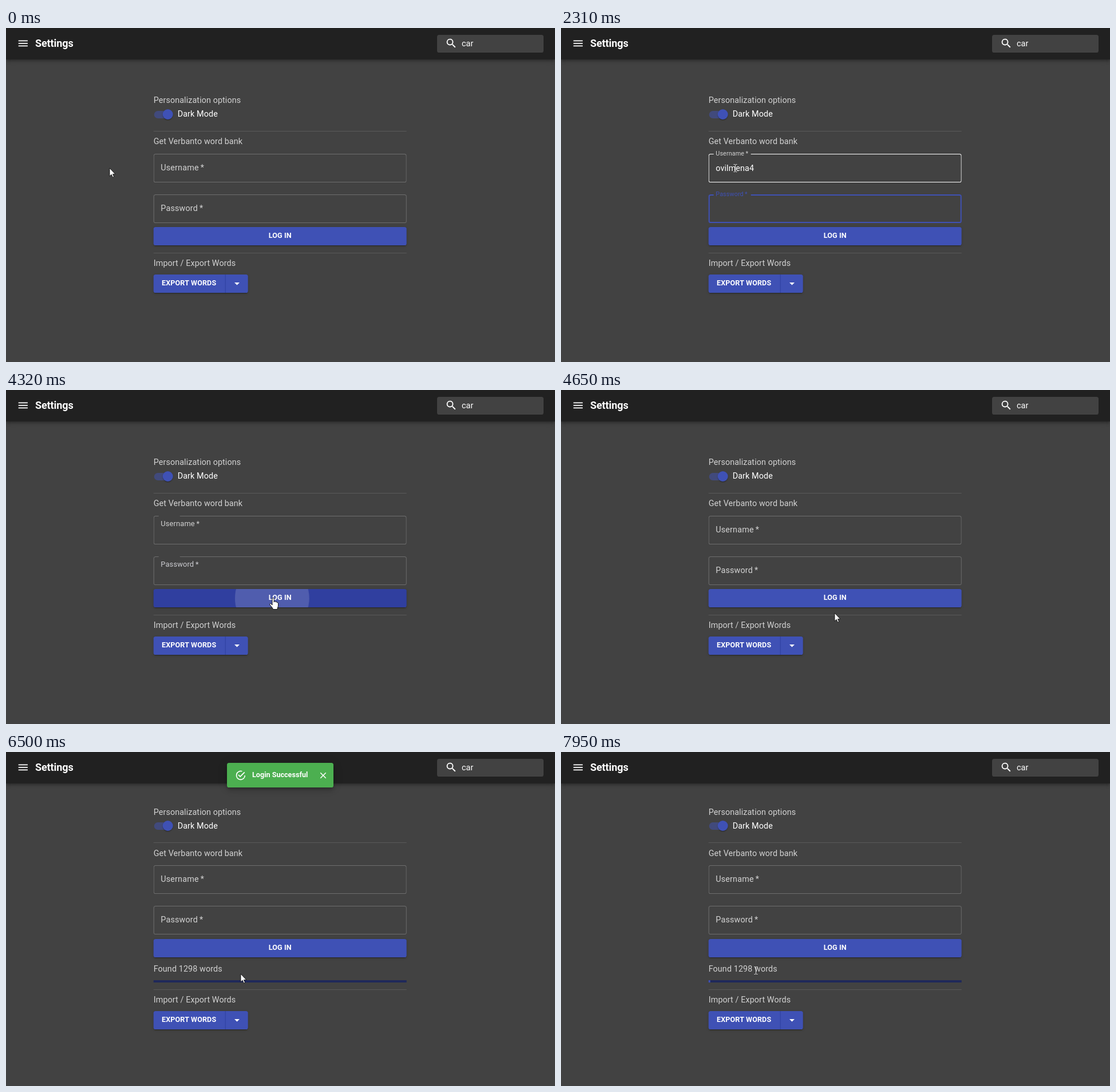
Write an HTML page that moves like this. It is 959 by 584 pixels and loops after 7990 ms.

```html
<!DOCTYPE html>
<html lang="en">
<head>
<meta charset="utf-8">
<title>Settings</title>
<style>
html, body { margin: 0; width: 100%; height: 100%; overflow: hidden; background: #424242; }
body { position: relative; font: 14.4px/17px Roboto, sans-serif; letter-spacing: .005em; color: #fff; }
div, p, svg { position: absolute; margin: 0; }
p { white-space: pre; }
svg { overflow: visible; fill: #fff; }
.bar { left: 0; right: 0; top: 0; height: 55px; background: #212121;
  box-shadow: 0 2px 4px -1px #0003, 0 4px 5px #00000024, 0 1px 10px #0000001f; }
.title { left: 51px; top: 16px; font: 600 18px/21px Roboto, sans-serif; letter-spacing: -.005em; }
.search { left: 753px; top: 11.5px; width: 185.5px; height: 31px; border-radius: 3.6px; background: #424242; }
.group { left: 258px; top: 0; width: 442px; transform: translateX(-.3px); }
.soft { color: rgba(255,255,255,.76); }
.rule { left: 0; width: 442px; height: 1px; background: rgba(255,255,255,.12); }
.track { left: .7px; top: 145px; width: 30.6px; height: 12.6px; border-radius: 7px; background: #3f51b5; opacity: .5; }
.thumb { left: 16px; top: 142px; width: 18px; height: 18px; border-radius: 50%; background: #3f51b5;
  box-shadow: 0 2px 1px -1px #0003, 0 1px 1px #00000024, 0 1px 3px #0000001f; }
.field { left: 0; width: 442px; height: 50px; }
.box { inset: 0; border-radius: 3.6px; }
.notch { left: 9px; top: 0; height: 2px; background: #424242; }
.label { left: 0; top: 0; line-height: 14.4px; letter-spacing: .00938em; transform-origin: 0 0; }
.value { left: 12.6px; top: 17px; }
.caret { display: inline-block; width: 1px; height: 17px; margin-right: -1px; background: #fff; vertical-align: top; }
.button { left: 0; height: 32px; border-radius: 3.6px; background: #3f51b5; overflow: hidden; }
.lift { box-shadow: 0 3px 1px -2px #0003, 0 2px 2px #00000024, 0 1px 5px #0000001f; }
.caps { font: 600 12.6px/15px Roboto, sans-serif; letter-spacing: .009em; }
.ripple { left: -29px; top: -220px; width: 472px; height: 472px; border-radius: 50%; background: #fff; }
.progress { left: 0; top: 399.4px; width: 442px; height: 3.6px; background: #1f285a; }
.fill { left: 0; top: 0; height: 100%; background: #3f51b5; }
.toast { left: 386px; top: 19px; width: 186px; height: 43px; border-radius: 3.6px; background: #4caf50;
  box-shadow: 0 3px 5px -1px #0003, 0 6px 10px #00000024, 0 1px 18px #0000001f; }
#cursor { left: 0; top: 0; }
#cursor svg { left: 0; top: 0; width: 1px; height: 1px; }
</style>
</head>
<body>
<div class="bar">
  <svg style="left:19.3px;top:16.2px" width="21.6" height="21.6" viewBox="0 0 24 24"><path d="M3 18h18v-2H3zm0-5h18v-2H3zm0-7v2h18V6z"/></svg>
  <p class="title">Settings</p>
  <div class="search"></div>
  <svg style="left:767px;top:15.8px" width="21.6" height="21.6" viewBox="0 0 24 24"><path d="M15.5 14h-.79l-.28-.27a6.5 6.5 0 1 0-.7.7l.27.28v.79l5 4.99L20.49 19zm-6 0a4.5 4.5 0 1 1 0-9 4.5 4.5 0 0 1 0 9z"/></svg>
  <p style="left:796px;top:19px">car</p>
</div>

<div class="group" id="upper">
  <p class="soft" style="top:118.3px">Personalization options</p>
  <div class="track"></div><div class="thumb"></div>
  <p style="left:42px;top:142.3px">Dark Mode</p>
  <div class="rule" style="top:180px"></div>
  <p class="soft" style="top:190.3px">Get Verbanto word bank</p>
  <div class="field" id="user" style="top:220px">
    <div class="box"></div><div class="notch"></div>
    <p class="label">Username&thinsp;*</p>
    <p class="value"><span class="text"></span><span class="caret"></span></p>
  </div>
  <div class="field" id="pass" style="top:291px">
    <div class="box"></div><div class="notch"></div>
    <p class="label">Password&thinsp;*</p>
    <p class="value"><span class="text"></span><span class="caret"></span></p>
  </div>
  <div class="button lift" id="login" style="top:348.2px;width:442px">
    <div class="ripple"></div>
  </div>
  <p class="caps" style="top:355.3px;width:442px;text-align:center">LOG IN</p>
</div>

<div class="group" id="found">
  <p class="soft" style="top:371px">Found <span id="count">0</span> words</p>
  <div class="progress"><div class="fill"></div></div>
</div>

<div class="group" id="lower">
  <div class="rule" style="top:392.5px"></div>
  <p class="soft" style="top:403px">Import / Export Words</p>
  <div class="button lift" style="top:431px;width:165px"></div>
  <div style="left:125px;top:431px;width:1px;height:32px;background:#303f9f"></div>
  <p class="caps" style="left:14.3px;top:438px">EXPORT WORDS</p>
  <svg style="left:134.5px;top:436px" width="21.6" height="21.6" viewBox="0 0 24 24"><path d="M7 10l5 5 5-5z"/></svg>
</div>

<div class="toast">
  <svg style="left:14px;top:11.5px" width="19.8" height="19.8" viewBox="0 0 24 24"><path d="M20 12A8 8 0 1 1 12 4c.76 0 1.5.11 2.2.31l1.57-1.57A10 10 0 1 0 22 12M7.91 10.08L6.5 11.5 11 16 21 6l-1.41-1.42L11 13.17z"/></svg>
  <p class="caps" style="left:44px;top:13px;letter-spacing:0">Login Successful</p>
  <svg style="left:158.5px;top:12.5px" width="18" height="18" viewBox="0 0 24 24"><path d="M19 6.41L17.59 5 12 10.59 6.41 5 5 6.41 10.59 12 5 17.59 6.41 19 12 13.41 17.59 19 19 17.59 13.41 12z"/></svg>
</div>

<div id="cursor">
  <svg class="arrow"><path stroke="#000" stroke-width=".8" d="M0 0V14.2L3.2 11.2 5.4 16.2 7.6 15.2 5.5 10.4H9.8z"/></svg>
  <svg class="beam"><path fill="none" stroke="#ddd" d="M-2.5-6.5H0M1-6.5H3.5M-2.5 6.5H0M1 6.5H3.5M.5-6V6"/></svg>
  <svg class="hand"><path transform="translate(-6 0)" stroke="#000" stroke-width=".9" d="M5 13V2a1.6 1.6 0 0 1 3.2 0V8l.3-1a1.5 1.5 0 0 1 2.6 1l.2-.2a1.4 1.4 0 0 1 2.4 1.1 1.2 1.2 0 0 1 1.8 1.1V14c0 2-1.4 3.5-1.6 6.5H6.5C6 17.5 2 14.5.8 12 .2 10.3 2.3 9.8 3.3 11z"/></svg>
</div>

<script>
const LOOP = 7990;
const OUT = 'cubic-bezier(0,0,.2,1)', IN_OUT = 'cubic-bezier(.4,0,.2,1)';
const $ = sel => document.querySelector(sel);
const start = document.timeline.currentTime || 0;

// keys: [ms, value, easing towards the next key]; without easing the value holds
function play(sel, prop, keys) {
  const all = [[0, keys[0][1]], ...keys, [LOOP, keys[keys.length - 1][1]]];
  const frames = all.map(([ms, value, easing = 'step-end']) => ({ offset: ms / LOOP, [prop]: value, easing }));
  $(sel).animate(frames, { duration: LOOP, iterations: Infinity }).startTime = start;
}

// Form fields
const ring = (width, color) => `inset 0 0 0 ${width}px ${color}`;
const idle = ring(1, 'rgba(255,255,255,.23)'), hover = ring(1, '#fff'), focus = ring(2, '#3f51b5');
const grey = 'rgba(255,255,255,.76)', blue = '#3f51b5';
const rest = 'translate(12.6px,17.6px) scale(1)', raised = 'translate(12.6px,-5.4px) scale(.75)';
const CLEAR = 4270;

function field(id, focusAt, blurAt, borders) {
  play(id + ' .box', 'boxShadow', borders);
  play(id + ' .notch', 'width', [[focusAt + 50, '0px', OUT], [focusAt + 150, '65px'],
    [CLEAR, '65px', 'linear'], [CLEAR + 120, '0px']]);
  play(id + ' .label', 'transform', [[focusAt, rest, OUT], [focusAt + 200, raised],
    [CLEAR, raised, OUT], [CLEAR + 200, rest]]);
  play(id + ' .label', 'color', [[focusAt, grey, OUT], [focusAt + 200, blue],
    [blurAt, blue, OUT], [blurAt + 200, grey]]);
}
field('#user', 260, 1950, [[0, idle], [180, hover], [260, focus], [1950, hover], [3729, idle]]);
field('#pass', 1950, 4175, [[0, idle], [1950, focus], [4175, idle]]);

// Log-in button
play('#login', 'backgroundColor', [[4039, '#3f51b5', IN_OUT], [4289, '#303f9f'],
  [4450, '#303f9f', IN_OUT], [4650, '#3f51b5']]);
play('.ripple', 'transform', [[4175, 'scale(0)', IN_OUT], [4725, 'scale(1)']]);
play('.ripple', 'opacity', [[0, 0], [4175, .1, 'linear'], [4320, .16, 'linear'], [4660, 0]]);

// Page shift, progress and toast
const SHIFT = 4850;
play('#upper', 'top', [[0, '0px'], [SHIFT, '-21.6px']]);
play('#lower', 'top', [[0, '0px'], [SHIFT, '22px']]);
play('#found', 'visibility', [[0, 'hidden'], [SHIFT, 'visible']]);
play('.fill', 'width', [[6500, '0px', 'linear'], [7160, '2px', 'linear'], [7950, '3px']]);
const small = 'scale(.75,.5625)';
play('.toast', 'transform', [[SHIFT, small, IN_OUT], [5090, 'scale(1)'], [7720, 'scale(1)', IN_OUT], [7920, small]]);
play('.toast', 'opacity', [[SHIFT, 0, IN_OUT], [5090, 1], [7720, 1, IN_OUT], [7920, 0]]);

// Pointer
const at = (x, y) => `translate(${x}px,${y}px)`;
play('#cursor', 'transform', [[30, at(181, 245), 'ease-in-out'], [270, at(304, 245)],
  [3630, at(304, 245), 'linear'], [4100, at(466, 363)],
  [4420, at(466, 363), 'linear'], [4490, at(478, 390)],
  [5680, at(478, 390), 'ease-in-out'], [5970, at(410, 388)],
  [6700, at(410, 388), 'ease-out'], [7100, at(370, 384)],
  [7170, at(370, 384), 'ease-in-out'], [7490, at(340, 382)]]);
const shapes = [[0, 'arrow'], [180, 'beam'], [3729, 'arrow'], [3813, 'beam'], [4011, 'arrow'],
  [4039, 'hand'], [4460, 'arrow'], [6960, 'beam']];
for (const name of ['arrow', 'beam', 'hand'])
  play('.' + name, 'visibility', shapes.map(([ms, shape]) => [ms, shape === name ? 'visible' : 'hidden']));

// Typing, carets and the word count
const name = 'ovilmena4';
const nameTimes = [...name].map((_, i) => 1160 + i * 65);
const passTimes = [2570, 2640, 2710, 2870, 2935, 3000, 3200, 3300];
const typed = (times, t) => t < CLEAR ? times.filter(ms => ms <= t).length : 0;
const within = (t, ...spans) => spans.some(([from, to]) => t >= from && t < to);

function show(id, text, caret) {
  $(id + ' .text').textContent = text;
  $(id + ' .caret').style.visibility = caret ? 'visible' : 'hidden';
}
function draw(now) {
  const t = Math.max(0, now - start) % LOOP;
  show('#user', name.slice(0, typed(nameTimes, t)), within(t, [260, 790], [1160, 1950]));
  show('#pass', '•'.repeat(typed(passTimes, t)), within(t, [1950, 2310], [2570, 3830]));
  $('#count').textContent = t < 6500 ? 0 : 1298;
  requestAnimationFrame(draw);
}
draw(start);
</script>
</body>
</html>
```
